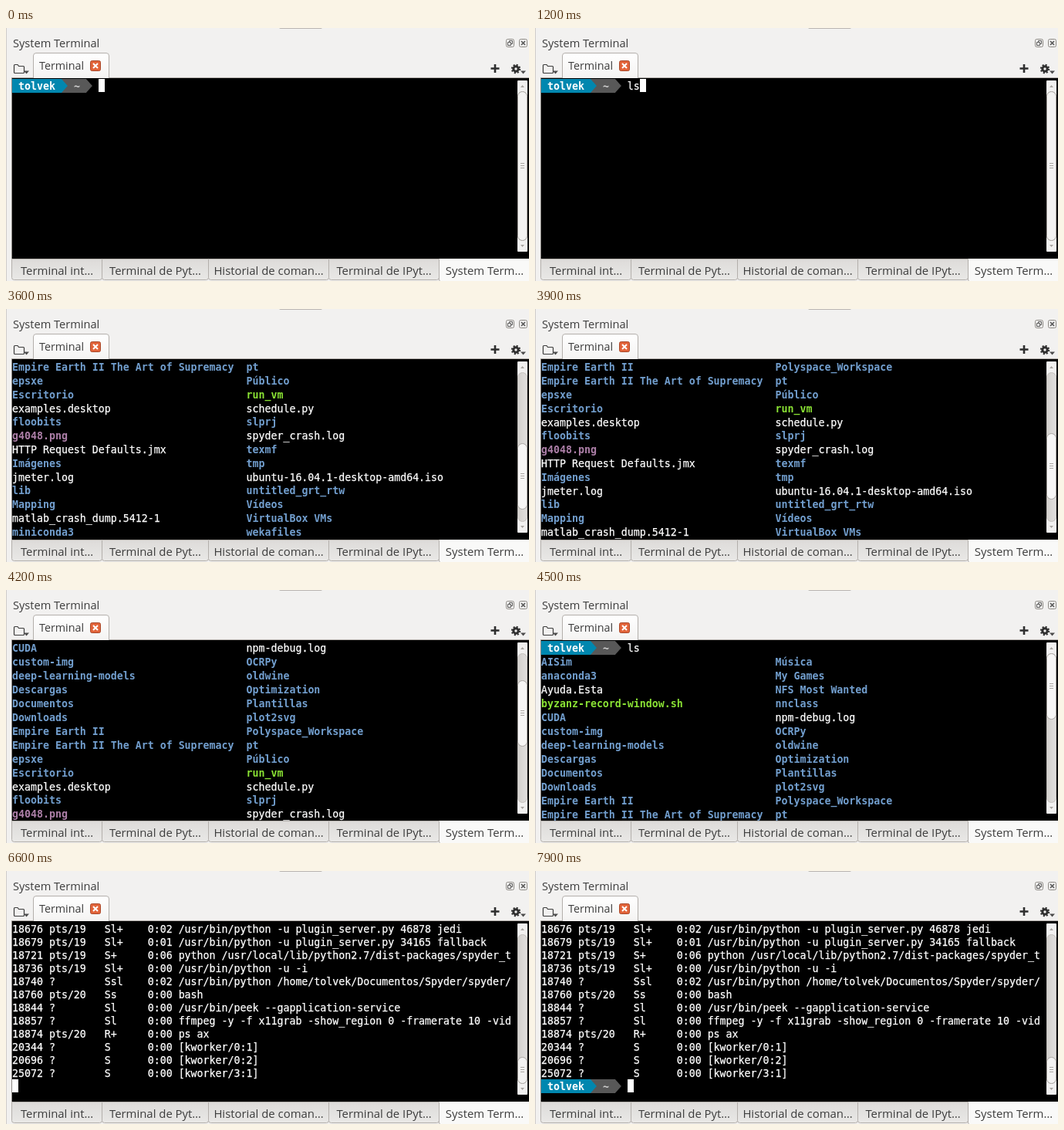
Animation of 678 by 328 pixels, one loop 8 s. Source, as an HTML page:

```html
<!DOCTYPE html>
<html lang="es">
<head>
<meta charset="utf-8">
<title>System Terminal</title>
<style>
html, body { margin: 0; width: 100%; height: 100%; overflow: hidden; background: #f2f1f0; }
svg { position: absolute; left: 0; top: 0; }
svg text { font-family: "Open Sans", "Noto Sans", sans-serif; fill: #3c3c3c; }
#view {
  position: absolute; left: 8px; top: 66px; width: 655px; height: 233px; overflow: hidden;
  font: 13.288px "DejaVu Sans Mono", monospace; color: #fff; white-space: pre;
  -webkit-text-stroke: .25px;
}
/* Line boxes are 2px taller than the rows to seat the text 1px lower */
.row { height: 17px; line-height: 19px; }
.tall { height: 18px; line-height: 20px; }
b { font-weight: 700; -webkit-text-stroke: 0; }
.dir { color: #729fcf; }
.exe { color: #8ae234; }
.img { color: #ad7fa8; }
.seg, .tip, .cur { display: inline-block; vertical-align: top; height: 18px; }
.user { background: #0087af; }
.path { background: #585858; color: #d0d0d0; }
.tip { width: 8px; }
.tip::before { content: ""; display: block; height: 18px; clip-path: polygon(0 0, 100% 50%, 0 100%); }
.tip.one { background: #585858; }
.tip.one::before { background: #0087af; }
.tip.two::before { background: #585858; }
.cur { width: 8px; background: #fff; }
</style>
</head>
<body>
<svg width="678" height="328" viewBox="0 0 678 328">
  <defs>
    <linearGradient id="tabTop" x2="0" y2="1"><stop stop-color="#fff"/><stop offset="1" stop-color="#f4f3f2"/></linearGradient>
    <linearGradient id="tabLow" x2="0" y2="1"><stop stop-color="#dddbd9"/><stop offset="1" stop-color="#e9e8e6"/></linearGradient>
    <linearGradient id="track"><stop stop-color="#d2cfcc"/><stop offset="1" stop-color="#e2e0de"/></linearGradient>
  </defs>
  <rect width="678" height="328" fill="#f2f1f0"/>
  <path d="M.5 0V328" stroke="#cfccc9"/>
  <rect x="354" y="-3" width="56" height="4" rx="2" fill="#b9b5b1"/>
  <text x="9" y="25" font-size="14.6">System Terminal</text>

  <g fill="none" stroke="#5a5a5a">
    <rect id="float" x="648.5" y="14.5" width="10" height="10" rx="2" stroke="#8c8984"/>
    <path d="M652.5 18.5V16.5H656.5V20.5H654.5M650.5 18.5H654.5V22.5H650.5Z"/>
    <rect x="665.5" y="14.5" width="10" height="10" rx="2" stroke="#8c8984"/>
    <path d="M668 17L673 22M673 17L668 22" stroke-width="1.7"/>
  </g>

  <path d="M10.5 57.5V48.5Q10.5 47.5 11.5 47.5H15L16.5 49.5H22.5Q23.5 49.5 23.5 50.5V57.5Q23.5 58.5 22.5 58.5H11.5Q10.5 58.5 10.5 57.5Z" fill="none" stroke="#3c3c3c" stroke-width="1.2"/>
  <path d="M23 55.5H30L26.5 59.5Z" fill="#4c4c4c"/>

  <path d="M7 64.5H678" stroke="#b3afab"/>
  <path d="M35.5 65V36Q35.5 32.5 39 32.5H130Q133.5 32.5 133.5 36V65" fill="url(#tabTop)" stroke="#b3afab"/>
  <text x="43" y="54" font-size="14.3">Terminal</text>
  <rect x="109.5" y="42.5" width="13" height="13" rx="2" fill="#e2643a" stroke="#a9482a"/>
  <path d="M113 46L119 52M119 46L113 52" stroke="#fff" stroke-width="2"/>

  <path d="M628.5 52.5H639.5M634 47V58" stroke="#2e2e2e" stroke-width="2.6"/>
  <circle cx="661" cy="53" r="3.2" fill="none" stroke="#2e2e2e" stroke-width="3"/>
  <circle cx="661" cy="53" r="5.2" fill="none" stroke="#2e2e2e" stroke-width="2" stroke-dasharray="2.04"/>
  <path d="M667 55.5H674L670.5 59.5Z" fill="#4c4c4c"/>

  <path d="M7.5 65V299" stroke="#8f8b87"/>
  <rect x="8" y="65" width="670" height="234" fill="#000"/>

  <rect x="663" y="68" width="13" height="222" rx="1" fill="#f2f1f0"/>
  <rect x="663.5" y="82.5" width="12" height="193" rx="6" fill="url(#track)" stroke="#c4c0bc"/>
  <path d="M667 77L669.5 74L672 77ZM667 281L669.5 284L672 281Z" fill="#aaa6a2"/>
  <rect id="thumb" x="663.5" width="12" rx="6" stroke="#aaa6a2"/>
  <path id="grip" d="M667 -2.5H672M667 .5H672M667 3.5H672" stroke="#aaa6a2"/>

  <g id="tabs"></g>
</svg>
<div id="view"></div>

<script>
const LOOP = 8000;
const USER = "tolvek";
const $ = id => document.getElementById(id);

// Bottom tabs: left edge, right edge, label
$("tabs").innerHTML = [
  [7, 124, "Terminal int…"], [124, 262, "Terminal de Pyt…"], [262, 418, "Historial de coman…"],
  [418, 561, "Terminal de IPyt…"], [561, 679, "System Term…"]
].map(([l, r, label], i) => {
  const on = i === 4, foot = on ? 329 : 326.5;
  return `<path d="M${l + .5} 299.5V${foot - 3}q0 3 3 3H${r - 2.5}q3 0 3 -3V299.5${on ? "" : "Z"}"
    fill="${on ? "#f9f9f8" : "url(#tabLow)"}" stroke="#b3afab"/>
    <text x="${(l + r) / 2 + .5}" y="320" font-size="14.9" text-anchor="middle">${label}</text>`;
}).join("");

// Marks: - plain file, * executable, + image; directories have none
const files = `AISim|Música
anaconda3|My Games
-Ayuda.Esta|NFS Most Wanted
*byzanz-record-window.sh|nnclass
CUDA|-npm-debug.log
custom-img|OCRPy
deep-learning-models|oldwine
Descargas|Optimization
Documentos|Plantillas
Downloads|plot2svg
Empire Earth II|Polyspace_Workspace
Empire Earth II The Art of Supremacy|pt
epsxe|Público
Escritorio|*run_vm
-examples.desktop|-schedule.py
floobits|slprj
+g4048.png|-spyder_crash.log
-HTTP Request Defaults.jmx|texmf
Imágenes|tmp
-jmeter.log|-ubuntu-16.04.1-desktop-amd64.iso
lib|untitled_grt_rtw
Mapping|Vídeos
-matlab_crash_dump.5412-1|VirtualBox VMs
miniconda3|wekafiles
mlclass`.split("\n");

const procs = `18676|pts/19|Sl+|0:02|/usr/bin/python -u plugin_server.py 46878 jedi
18679|pts/19|Sl+|0:01|/usr/bin/python -u plugin_server.py 34165 fallback
18721|pts/19|S+|0:06|python /usr/local/lib/python2.7/dist-packages/spyder_t
18736|pts/19|Sl+|0:00|/usr/bin/python -u -i
18740|?|Ssl|0:02|/usr/bin/python /home/${USER}/Documentos/Spyder/spyder/
18760|pts/20|Ss|0:00|bash
18844|?|Sl|0:00|/usr/bin/peek --gapplication-service
18857|?|Sl|0:00|ffmpeg -y -f x11grab -show_region 0 -framerate 10 -vid
18874|pts/20|R+|0:00|ps ax
20344|?|S|0:00|[kworker/0:1]
20696|?|S|0:00|[kworker/0:2]
25072|?|S|0:00|[kworker/3:1]`.split("\n");

const row = (html, tall) => `<div class="row${tall ? " tall" : ""}">${html}</div>`;
const cursor = h => `<i class="cur" style="height:${h}px"></i>`;
const prompt = rest => row(
  `<b class="seg user"> ${USER} </b><i class="tip one"></i><b class="seg path"> ~ </b><i class="tip two"></i> ${rest}`, true);

function cell(entry, width) {
  const kind = { "*": "exe", "+": "img", "-": "" }[entry[0]];
  const name = kind === undefined ? entry : entry.slice(1);
  const pad = " ".repeat(Math.max(0, width - name.length));
  return (kind === "" ? name : `<b class="${kind || "dir"}">${name}</b>`) + pad;
}

const listing = [prompt("ls"), ...files.map(line => {
  const [a, b] = line.split("|");
  const plain = a[0] === "-" && b && b[0] === "-";
  return row(cell(a, 38) + (b ? cell(b, 0) : ""), !plain);
})];

const processes = procs.map(line => {
  const [pid, tty, stat, time, cmd] = line.split("|");
  return row(`${pid} ${tty.padEnd(9)}${stat.padEnd(7)}${time} ${cmd}`);
});

const typing = [[0, ""], [1100, "l"], [1200, "ls"], [2500, ""], [5900, "ps"],
  [6200, "ps "], [6300, "ps a"], [6400, "ps ax"], [6600, ""]];
const thumbTop = [[0, 82], [2500, 190], [3300, 186], [3400, 182], [3500, 178], [3600, 174],
  [3700, 170], [3800, 166], [3900, 161], [4000, 147], [4100, 132], [4200, 117],
  [4400, 100], [4500, 82], [5000, 190], [6600, 241]];
const thumbSize = [[0, 194], [2500, 86], [6600, 35]];
const thumbFill = [[0, "#f3f2f1"], [3000, "#fcfcfb"], [3100, "#f7f6f5"], [5000, "#fcfcfb"], [5300, "#f3f2f1"]];
const cursorSize = [[0, 17], [500, 18], [1100, 17], [2600, 18], [5900, 17]];
const floatFill = [[0, "none"], [7800, "#fff"], [7900, "none"]];

const at = (steps, t) => steps.filter(s => s[0] <= t).pop()[1];

function lines(t, top) {
  const cur = cursor(at(cursorSize, t));
  const live = prompt(at(typing, t) + cur);
  if (t < 2500) return [live];
  if (t < 6600) {
    const first = Math.ceil((top - 82) / 7.72);
    return [...listing, t < 2600 ? row(cur) : live].slice(first, first + 13);
  }
  return [...processes, t < 6700 ? row(cur) : live];
}

let shown = "";
function draw(t) {
  const top = at(thumbTop, t), size = at(thumbSize, t);
  const html = lines(t, top).join("");
  if (html !== shown) $("view").innerHTML = shown = html;
  $("thumb").setAttribute("y", top + .5);
  $("thumb").setAttribute("height", size - 1);
  $("thumb").setAttribute("fill", at(thumbFill, t));
  $("grip").setAttribute("transform", `translate(0 ${Math.floor(top + size / 2) - 1})`);
  $("float").setAttribute("fill", at(floatFill, t));
}

const start = performance.now();
function tick() {
  draw((performance.now() - start) % LOOP);
  requestAnimationFrame(tick);
}
tick();
</script>
</body>
</html>
```
